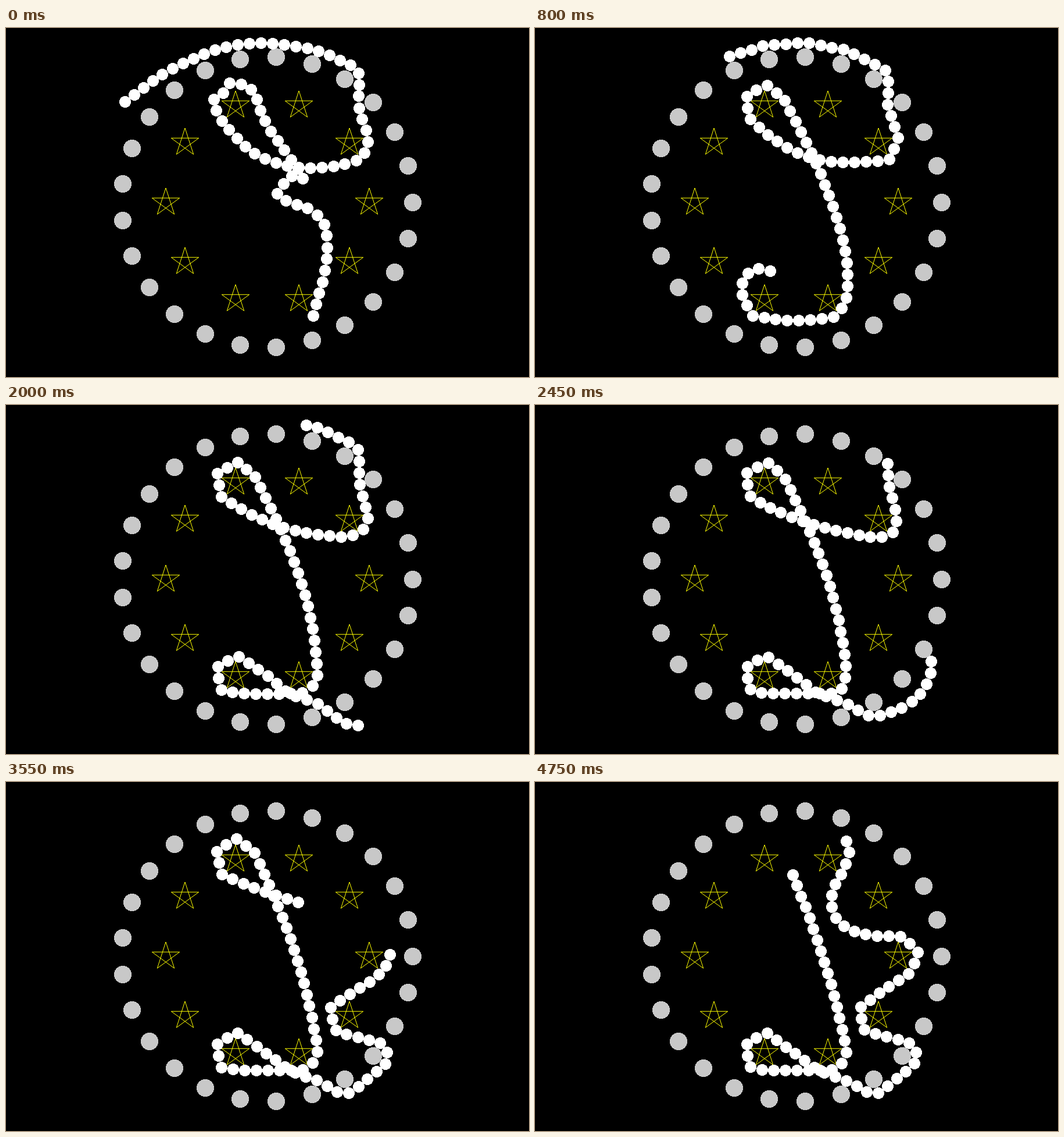
An HTML page with a canvas that plays this animation: 900x600 px, repeating every 4800 ms.

```html
<!DOCTYPE html>
<html lang="en">
<head>
<meta charset="utf-8">
<title>Rope among pegs and stars</title>
<style>
  html, body { margin: 0; width: 100%; height: 100%; overflow: hidden; background: #000; }
  canvas { display: block; }
</style>
</head>
<body>
<canvas id="stage" width="900" height="600"></canvas>
<script>
const ctx = document.getElementById('stage').getContext('2d');
const STEP = 50, LOOP = 4800, SUB = 5, LINKS = 75, GAP = 20;

// Bends of the rope at the start, from head to tail
const bends = [
  [529, 495], [552, 398], [548, 338], [520, 311], [483, 298], [467, 285], [493, 255],
  [513, 258], [491, 227], [446, 161], [422, 106], [385, 95], [374, 112], [358, 123],
  [372, 160], [429, 216], [505, 240], [603, 228], [623, 196], [608, 138], [608, 98],
  [607, 77], [592, 64], [518, 35], [399, 29], [286, 70], [205, 127]
];

// Key points of the head: time in ms, x, y. It rests between the two legs.
const legs = [
  [
    [0, 529, 495], [100, 505, 514], [350, 402, 508], [500, 352, 485], [600, 338, 445],
    [700, 362, 406], [800, 405, 418], [1000, 457, 462], [1150, 479, 475]
  ],
  [
    [1500, 479, 475], [1750, 528, 508], [1960, 592, 554], [2060, 627, 537], [2250, 676, 490],
    [2450, 682, 441], [2600, 648, 442], [2900, 565, 430], [3050, 541, 394], [3200, 575, 363],
    [3400, 645, 338], [3550, 661, 297], [3700, 638, 260], [3880, 580, 274], [4100, 507, 267],
    [4250, 483, 218], [4500, 521, 157], [4670, 549, 118], [4750, 536, 102]
  ]
];

// Smooth curve through rows of [key, x, y], held after the last key
function along(rows, t) {
  const last = rows.length - 1;
  let i = 0;
  while (i < last - 1 && t > rows[i + 1][0]) i++;
  const a = rows[i], b = rows[i + 1];
  const before = rows[Math.max(i - 1, 0)], after = rows[Math.min(i + 2, last)];
  const span = b[0] - a[0], u = Math.min(1, (t - a[0]) / span);
  return [1, 2].map(k => {
    const m = span * (b[k] - before[k]) / (b[0] - before[0]);
    const n = span * (after[k] - a[k]) / (after[0] - a[0]);
    const d = a[k] - b[k];
    return a[k] + u * (m + u * (-3 * d - 2 * m - n + u * (2 * d + m + n)));
  });
}

const dist = (p, q) => Math.hypot(p[0] - q[0], p[1] - q[1]);

// Count points at even distances on a curve through the given points
function spread(points, count) {
  let key = 0, length = 0;
  const rows = points.map((p, i) => [key += i && dist(p, points[i - 1]), ...p]);
  const fine = Array.from({ length: 2001 }, (_, i) => along(rows, key * i / 2000));
  const run = fine.map((p, i) => length += i && dist(p, fine[i - 1]));
  return Array.from({ length: count }, (_, i) => {
    const at = run.findIndex(d => d >= length * i / (count - 1) - 1e-6);
    return [...fine[at]];
  });
}

const ring = (n, r, x = 450, y = 300, turn = 0) => Array.from({ length: n }, (_, i) => {
  const a = turn + i * 2 * Math.PI / n;
  return [x + r * Math.cos(a), y + r * Math.sin(a)];
});
const whole = p => p.map(v => Math.floor(v + 1e-6));

const pegs = ring(25, 250).map(whole);
const stars = ring(10, 175).map(whole).map(([x, y]) => ({ x, y, tips: ring(5, 25, x, y, -Math.PI / 2) }));

// Round zones that link centres cannot enter
const zones = [
  ...pegs.map(([x, y]) => [x, y, 25]),
  ...stars.flatMap(s => [[s.x, s.y, 28], ...s.tips.map(([x, y]) => [x, y, 10])])
];

// Move p along its line from c until it is r away
function setApart(p, c, r) {
  const k = r / (dist(p, c) || 1);
  p[0] = c[0] + (p[0] - c[0]) * k;
  p[1] = c[1] + (p[1] - c[1]) * k;
}

function pushOut(p) {
  for (const zone of zones) {
    if (dist(p, zone) < zone[2]) setApart(p, zone, zone[2]);
  }
}

function moveRope(rope, t) {
  rope[0] = along(legs[t < legs[1][0][0] ? 0 : 1], t);
  pushOut(rope[0]);
  for (let i = 1; i < LINKS; i++) {
    for (let k = 0; k < 3; k++) {
      setApart(rope[i], rope[i - 1], GAP);
      pushOut(rope[i]);
    }
  }
}

function simulate() {
  const rope = spread(bends, LINKS);
  const poses = [];
  for (let t = 0; t < LOOP; t += STEP) {
    for (let k = 1; t && k <= SUB; k++) moveRope(rope, t - STEP + k * STEP / SUB);
    poses.push(rope.map(p => p.map(Math.round)));
  }
  return poses;
}

// Disc with a hard edge
function disc(x, y, r) {
  for (let row = -r; row < r; row++) {
    const w = Math.round(Math.sqrt(r * r - (row + 0.5) ** 2));
    ctx.fillRect(x - w, y + row, 2 * w, 1);
  }
}

function drawStar({ tips }) {
  ctx.beginPath();
  for (let i = 0; i < 5; i++) ctx.lineTo(...tips[i * 2 % 5]);
  ctx.closePath();
  ctx.stroke();
}

function draw(rope) {
  ctx.fillStyle = '#000';
  ctx.fillRect(0, 0, 900, 600);
  ctx.fillStyle = '#c8c8c8';
  for (const p of pegs) disc(...p, 15);
  ctx.strokeStyle = '#ff0';
  stars.forEach(drawStar);
  ctx.fillStyle = '#fff';
  for (const p of rope) disc(...p, 10);
}

const poses = simulate();
const start = performance.now();
let shown = -1;

function tick() {
  const now = Math.floor((performance.now() - start) % LOOP / STEP);
  if (now !== shown) draw(poses[shown = now]);
  requestAnimationFrame(tick);
}
tick();
</script>
</body>
</html>
```
